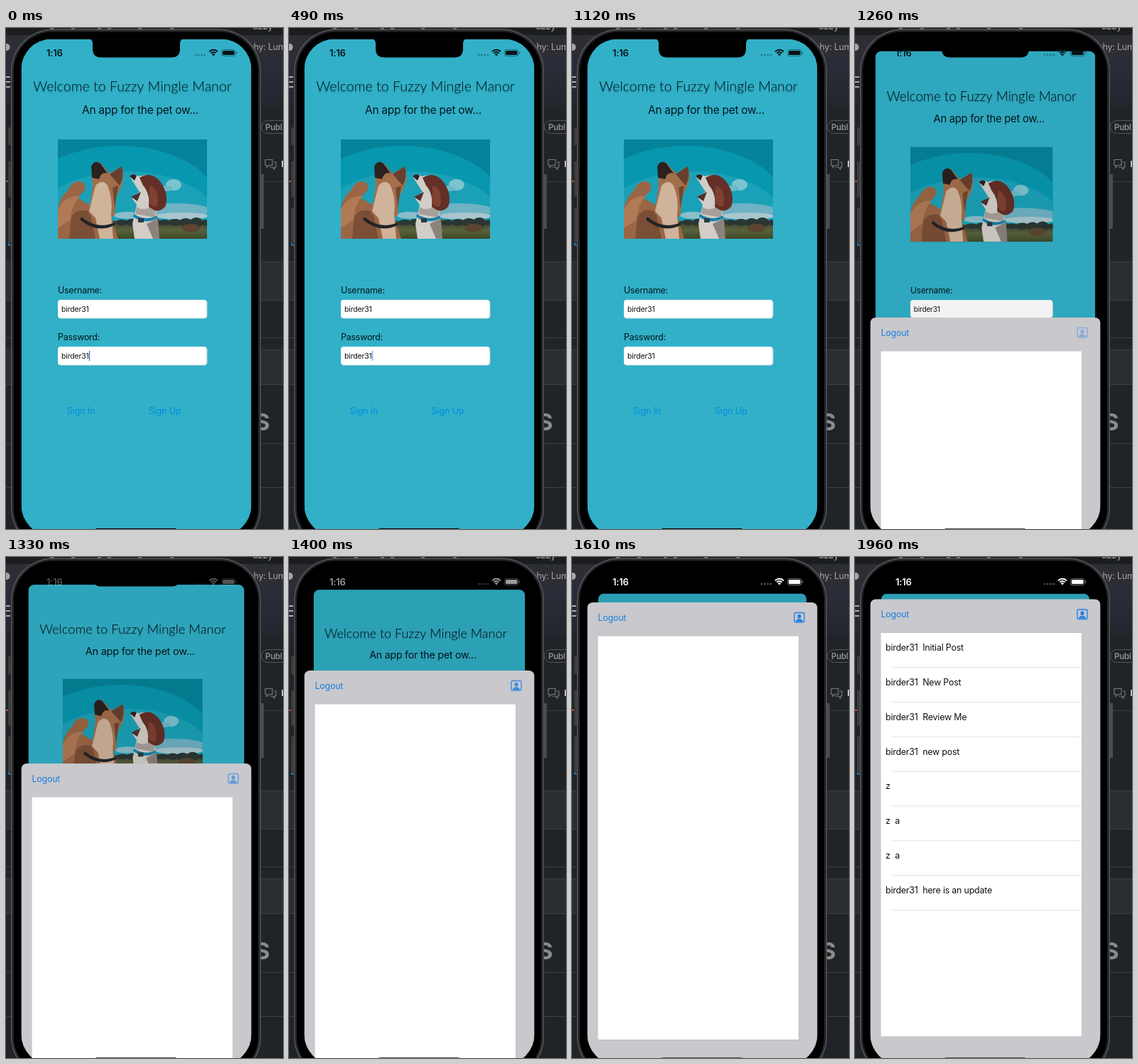
Write an HTML page with a canvas that moves like this. It is 390 px wide and 706 px high and loops after 8000 ms.

```html
<!DOCTYPE html>
<html lang="en">
<head>
<meta charset="utf-8">
<title>Sign in</title>
<style>
html, body { margin: 0; width: 100%; height: 100%; overflow: hidden; background: #202327; }
canvas { display: block; width: 390px; height: 706px; }
</style>
</head>
<body>
<canvas id="stage"></canvas>
<script>
const W = 390, H = 706, LOOP = 8000, TICK = 70;
const canvas = document.getElementById('stage');
const ctx = canvas.getContext('2d');
const dpr = window.devicePixelRatio || 1;
canvas.width = W * dpr;
canvas.height = H * dpr;

const SANS = 'Inter, Roboto, sans-serif';
const USER = 'birder31';
const TEAL = '#31b0c8';
const OPEN_AT = 1260, LIST_AT = 1960;
const SHEET_TOP = [408, 291, 160, 93, 72, 64, 61, 59.5];
const SHEET_END = 59.5;
const SCREEN = { x: 21.4, y: 15.6, w: 324.2, h: 699.4, bottom: 715 };
const posts = [
  [USER, 'Initial Post'], [USER, 'New Post'], [USER, 'Review Me'], [USER, 'new post'],
  ['z', ''], ['z', 'a'], ['z', 'a'], [USER, 'here is an update']
];

function rect(x, y, w, h, color) {
  ctx.fillStyle = color;
  ctx.fillRect(x, y, w, h);
}

function round(x, y, w, h, r, color) {
  ctx.beginPath();
  ctx.roundRect(x, y, w, h, r);
  ctx.fillStyle = color;
  ctx.fill();
}

function outline(x, y, w, h, r, color, width = 1) {
  ctx.beginPath();
  ctx.roundRect(x, y, w, h, r);
  ctx.strokeStyle = color;
  ctx.lineWidth = width;
  ctx.stroke();
}

function clipScreen(r) {
  ctx.beginPath();
  ctx.roundRect(SCREEN.x, SCREEN.y, SCREEN.w, SCREEN.h, r);
  ctx.clip();
}

function ellipse(x, y, rx, ry, color, turn = 0) {
  ctx.beginPath();
  ctx.ellipse(x, y, rx, ry, turn, 0, Math.PI * 2);
  ctx.fillStyle = color;
  ctx.fill();
}

function shape(d, color) {
  ctx.fillStyle = color;
  ctx.fill(new Path2D(d));
}

function text(str, x, y, size, color, weight = 400, family = SANS, align = 'left') {
  ctx.font = `${weight} ${size}px ${family}`;
  ctx.letterSpacing = family === SANS ? `${-0.016 * size}px` : '0px';
  ctx.textAlign = align;
  ctx.fillStyle = color;
  ctx.fillText(str, x, y);
}

function gradient(y0, y1, ...colors) {
  const g = ctx.createLinearGradient(0, y0, 0, y1);
  colors.forEach((c, i) => g.addColorStop(i / (colors.length - 1), c));
  return g;
}

function faded(alpha, draw) {
  ctx.save();
  ctx.globalAlpha *= alpha;
  draw();
  ctx.restore();
}

function drawDesktop() {
  rect(0, 0, W, H, '#202327');
  rect(0, 0, W, 11, '#1c1d20');
  rect(0, 10, W, 31, '#2c2e34');
  rect(0, 40, W, 70, gradient(40, 110, '#2b2d39', '#24262e'));
  for (const x of [62, 92, 129, 143, 186, 231]) rect(x, 0, 5, 1.5, '#85878b');
  text('uzzy', 347, 2, 13, '#a5a7aa');
  text('phy: Lum', 341, 31, 12.5, '#a4a6aa');
  ellipse(1, 27, 4.5, 5, '#a4a6aa');
  for (const y of [68, 75, 82]) rect(0, y, 6, 2, '#a9abad');

  rect(0, 329, W, 54, '#2a2d31');
  rect(0, 453, W, 49, '#2a2d31');
  for (const y of [216, 329, 383, 436, 453, 502, 585, 647]) rect(0, y, W, 1, '#3c3f43');

  outline(359.5, 130.5, 50, 18, 9, '#54575b');
  text('Publ', 365, 143.5, 11.5, '#8b8e92', 600);
  ctx.strokeStyle = '#74777b';
  ctx.lineWidth = 1.2;
  ctx.stroke(new Path2D('M365 185.5h10v8h-5l-3 3v-3h-2zM377 189h3v7h-2v3l-3-3h-4'));
  text('I', 387.5, 196, 12, '#d0d2d4', 700);
  text('S', 350, 567, 33, '#898b8e', 700);

  rect(0, 215, 4, 2, '#c8503a');
  rect(3, 301, 1.5, 5, '#2386cf');
  rect(3, 305, 4, 1.5, '#2386cf');
  for (const [y, h] of [[140, 25], [188, 50], [253, 50]]) rect(3, y, 5, h, '#3a3c40');
  rect(358, 206, 5, 77, '#4a4c50');
}

function drawDevice() {
  round(7, 1.5, 352, 734, 59, '#55575a');
  round(8.4, 2.9, 349.2, 731, 58, '#232427');
  round(11, 5.5, 344, 726, 55, '#000');
}

function drawPhoto() {
  ctx.save();
  ctx.beginPath();
  ctx.rect(73, 157, 210, 140);
  ctx.clip();
  rect(73, 157, 210, 140, '#05839a');
  ellipse(160, 250, 140, 84, '#0797ae');
  ellipse(170, 274, 130, 72, '#1ba1b7');
  ellipse(236, 221, 11, 8, '#7cc3d0');
  ellipse(226, 226, 8, 4, '#68b9c9');
  ellipse(238, 257, 50, 10, '#6eb2c4');
  ellipse(248, 265, 38, 5, '#a9c6cf');
  ellipse(170, 264, 18, 5, '#8bbdcb');
  rect(73, 272, 210, 25, gradient(272, 297, '#343c30', '#59623b', '#3f4828'));
  for (let i = 0; i < 9; i++) ellipse(163 + i * 15, 274, 9, 4 + i * 5 % 4, '#2b3632');
  ellipse(260, 282, 13, 6, '#5b4632');

  shape('M73 255Q76 238 87 229Q93 215 104 216Q116 220 109 231L100 239L119 250L146 258L158 297H73Z', '#9a6645');
  shape('M73 256Q84 235 104 237Q92 249 91 270L73 282Z', '#b07a56');
  shape('M92 266Q101 252 118 259L126 297H89Z', '#7b4e36');
  shape('M118 250L122 223L121 195Q126 185 134 191L146 205L163 195Q168 210 162 224L155 238L153 264Q135 274 116 261Z', '#a26e4b');
  shape('M126 222Q136 212 143 222Q151 242 148 262L151 297H132L126 268L117 258Z', '#cfb39b');
  shape('M121 211L120 195Q125 185 133 191L143 205Q134 202 131 213Z', '#2a2120');
  shape('M146 206L163 195Q167 209 160 222Z', '#67402f');
  shape('M150 225L158 222L153 254Z', '#70472f');
  shape('M106 266Q128 285 153 274V278Q127 290 104 270Z', '#222427');

  shape('M174 209Q180 204 187 209Q205 203 214 221L211 252L215 297H181L178 276L184 249L177 239L188 231Z', '#d2cdc7');
  shape('M188 211Q206 200 219 219Q230 237 224 252Q213 263 201 252Q203 233 193 222Z', '#642f27');
  shape('M202 222Q217 226 213 251Q204 254 201 242Z', '#7f4131');
  shape('M174 209Q179 204 184 208L181 215Z', '#2a2226');
  shape('M176 238L190 231L185 244Z', '#4c302d');
  shape('M184 252Q191 258 202 253L211 258L210 267L182 262Z', '#a79f99');
  shape('M180 262Q197 273 213 264V268Q195 278 179 266Z', '#1683aa');
  rect(186, 268, 8, 6, '#293b45');
  shape('M198 276L214 268L216 297H207Z', '#8b827c');
  ctx.restore();
}

function drawField(label, y, value) {
  text(label, 73, y - 9.5, 12.4, '#04161b');
  round(73, y + 0.4, 210.6, 26.4, 4.5, '#9fc9d3');
  round(73, y, 209.6, 25.8, 4, '#fff');
  text(value, 78, y + 17, 10.5, '#111');
}

function cursorAlpha(t) {
  if (t < 490) return 1;
  if (t < 840) return Math.max(0, 0.7 - (t - 490) / TICK * 0.35);
  if (t < 1050) return Math.min(1, 0.35 + (t - 840) / TICK * 0.35);
  return t < 1120 ? 0.5 : 0;
}

function signInAlpha(t) {
  if (t < 910 || t >= 1120) return 1;
  return t >= 980 && t < 1050 ? 0.3 : 0.6;
}

function drawLogin(t, p) {
  const scale = 1 - 0.096 * p;
  ctx.save();
  ctx.translate(183.5, 16 + 36 * p);
  ctx.scale(scale, scale);
  ctx.translate(-183.5, -16);
  clipScreen(p > 0 ? 9 : 42);
  rect(SCREEN.x, SCREEN.y, SCREEN.w, SCREEN.h, TEAL);

  ctx.save();
  ctx.shadowColor = 'rgba(0,30,40,.3)';
  ctx.shadowBlur = 1.5 * dpr;
  ctx.shadowOffsetY = 1.5 * dpr;
  text('Welcome to Fuzzy Mingle Manor', 178, 89, 19.6, '#04161b', 300, 'Lato, sans-serif', 'center');
  ctx.restore();
  text('An app for the pet ow...', 107, 121, 15.45, '#04161b');

  drawPhoto();
  drawField('Username:', 383, USER);
  drawField('Password:', 449, USER);
  const end = 78 + ctx.measureText(USER).width;
  faded(cursorAlpha(t), () => rect(end + 0.3, 455, 1.2, 14, '#2867d8'));
  faded(signInAlpha(t), () => text('Sign In', 85.5, 544, 12.8, '#008ee0'));
  text('Sign Up', 200.5, 544, 12.8, '#008ee0');

  rect(SCREEN.x, SCREEN.y, SCREEN.w, SCREEN.h, `rgba(0,0,0,${0.11 * p})`);
  ctx.restore();
}

function drawNotch() {
  shape('M115 14Q122 16 122 22V29Q122 41.5 134 41.5H233Q245 41.5 245 29V22Q245 16 252 14Z', '#000');
}

function drawStatus(color) {
  text('1:16', 57, 39.5, 13, color, 600);
  faded(0.4, () => {
    for (let i = 0; i < 4; i++) ellipse(267.2 + i * 4.2, 38, 1.2, 1.2, color);
  });
  ctx.strokeStyle = color;
  ctx.lineWidth = 1.9;
  for (const r of [8.2, 5]) {
    ctx.beginPath();
    ctx.arc(292, 39, r, -Math.PI * 0.76, -Math.PI * 0.24);
    ctx.stroke();
  }
  shape('M292 39.5L289.7 37Q292 35 294.3 37Z', color);
  faded(0.45, () => {
    outline(303.5, 30.5, 19.5, 9, 2.8, color);
    rect(324, 33.5, 1.3, 3, color);
  });
  round(305, 32, 16.5, 6, 1.5, color);
}

function drawProfileIcon(x, y) {
  const blue = '#2481df';
  outline(x, y, 14, 13.5, 2, blue, 1.4);
  ellipse(x + 7, y + 5.2, 2.6, 2.9, blue);
  shape(`M${x + 2} ${y + 12.6}Q${x + 2.5} ${y + 8.8} ${x + 7} ${y + 8.8}T${x + 12} ${y + 12.6}Z`, blue);
}

function drawSheet(t, top, step) {
  round(SCREEN.x, top, SCREEN.w, 720, 8, '#c8c8cd');
  text('Logout', 36.5, top + 25.5, 12.4, '#1d7fe3');
  faded(Math.min(1, 0.4 + step * 0.22), () => drawProfileIcon(313, top + 14.5));

  const y = top + 47.5;
  rect(36, y - 0.5, 283.5, 569.5, '#bbbbc0');
  rect(36.5, y, 282.5, 568.5, '#fff');
  if (t < LIST_AT) return;
  posts.forEach(([name, body], i) => {
    const rowY = y + i * 48.85;
    text(`${name}  ${body}`, 43, rowY + 25, 12.4, '#111');
    rect(52, rowY + 48, 267, 1, '#e3e3e5');
  });
}

function render(t) {
  ctx.setTransform(dpr, 0, 0, dpr, 0, 0);
  const step = Math.floor((t - OPEN_AT) / TICK);
  const open = step >= 0;
  const top = open ? SHEET_TOP[Math.min(step, SHEET_TOP.length - 1)] : SCREEN.bottom;
  const p = (SCREEN.bottom - top) / (SCREEN.bottom - SHEET_END);

  drawDesktop();
  drawDevice();
  ctx.save();
  clipScreen(42);
  drawLogin(t, p);
  drawNotch();
  if (step > 0) faded(Math.min(1, 0.05 + step * 0.28), () => drawStatus('#fff'));
  else drawStatus('#061318');
  if (open) drawSheet(t, top, step);
  round(126, 705, 114, 4, 2, open ? '#55555a' : '#000');
  ctx.restore();
}

function loop(now) {
  const t = now % LOOP;
  render(Math.floor(t / TICK) * TICK);
  requestAnimationFrame(loop);
}
requestAnimationFrame(loop);
</script>
</body>
</html>
```
